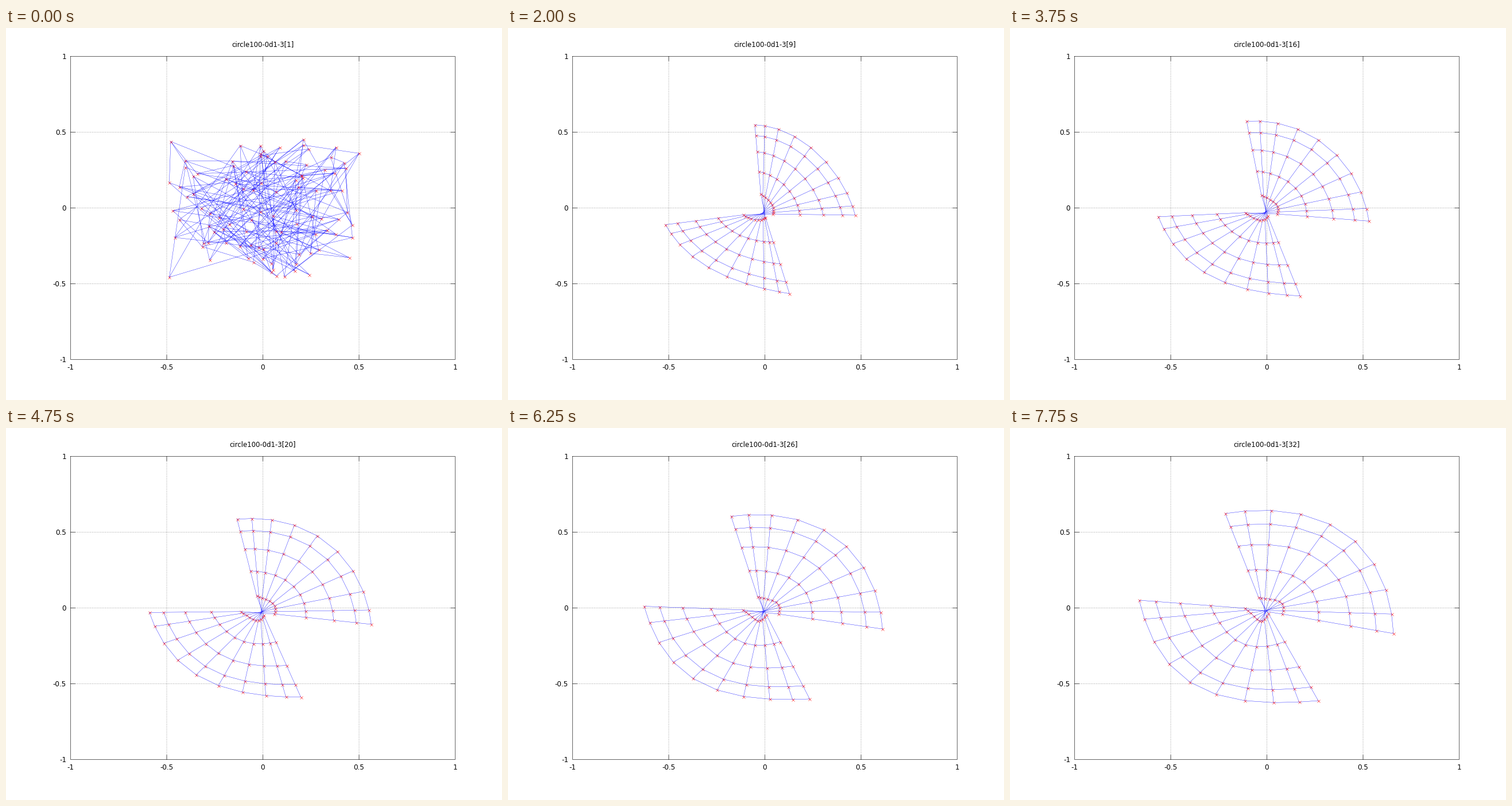
A matplotlib script that plays this animation: 864x648 px, repeating every 8 s.

```python
import numpy as np
import matplotlib.pyplot as plt
from matplotlib.animation import FuncAnimation
from matplotlib.collections import LineCollection

W, H = 864, 648
LEFT, RIGHT, TOP, BOTTOM = 112.5, 782.5, 49.5, 577.5
CENTER = np.array([446, 321])
STEPS, SIZE = 32, 10        # time steps, nodes along each side of the net
FIRST = 5                   # from here on the fan opens at a steady rate

# Spokes lie closer together at both ends of an arc
even = np.linspace(0, 1, SIZE)
spoke = (even + (1 - np.cos(np.pi * even)) / 2) / 2
knots = spoke[::3]

# How far each ring of one wing lies from the core to the rim
RINGS = np.array([1, 0.845, 0.612, 0.325, 0])


def arc(*points):
    """Cubic curve through four points, sampled at every spoke."""
    xy = np.array(points, float).T
    return np.stack([np.polyval(np.polyfit(knots, v, 3), spoke) for v in xy], 1)


def wing(rim, core):
    return core + (rim - core) * RINGS[:, None, None]


def fan(rim_a, core_a, core_b, rim_b):
    """Two wings joined at their cores: rings by spokes by xy."""
    lower = wing(arc(*rim_a), arc(*core_a))
    upper = wing(arc(*rim_b), arc(*core_b))
    return np.concatenate([lower, upper[::-1]])


narrow = fan([(285, 352), (331, 395), (416, 439), (480, 460)],
             [(410, 328), (423, 333), (441, 333), (448, 331)],
             [(458, 324), (459, 315), (453, 299), (442, 288)],
             [(591, 319), (562, 266), (497, 197), (442, 173)])
wide = fan([(225, 300), (277, 411), (409, 475), (537, 475)],
           [(409, 314), (425, 328), (439, 336), (450, 323)],
           [(474, 324), (474, 306), (452, 298), (433, 295)],
           [(668, 358), (634, 237), (506, 150), (375, 149)])


def net_at(n):
    if n == 1:
        rng = np.random.default_rng(3)
        return rng.uniform([284, 181], [615, 441], (SIZE, SIZE, 2))
    if n < FIRST:
        scale = 1 - 0.25 * ((FIRST - n) / 3) ** 2
        return CENTER + (narrow - CENTER) * scale
    t = (n - FIRST) / (STEPS - FIRST)
    return narrow + (wide - narrow) * t ** 0.9


plt.rcParams['font.family'] = 'DejaVu Sans'
fig = plt.figure(figsize=(W / 72, H / 72), dpi=72, facecolor='white')
ax = fig.add_axes([0, 0, 1, 1])
ax.set(xlim=(0, W), ylim=(H, 0))
ax.axis('off')


def line(xs, ys, **style):
    ax.plot(xs, ys, **{'color': 'black', 'lw': 0.6, 'snap': False, **style})


def draw_frame():
    dots = dict(color='0.45', lw=0.8, ls=(0, (1.2, 2.4)), dash_capstyle='butt')
    for i, label in enumerate(['-1', '-0.5', '0', '0.5', '1']):
        x = LEFT + (RIGHT - LEFT) * i / 4
        y = BOTTOM - (BOTTOM - TOP) * i / 4
        ax.text(x, 595, label, size=12, ha='center', va='baseline')
        ax.text(105, y + 4, label, size=12, ha='right', va='baseline')
        if 0 < i < 4:
            line([x, x], [TOP, BOTTOM], **dots)
            line([LEFT, RIGHT], [y, y], **dots)
            for a, b in ((TOP, TOP + 8), (BOTTOM - 8, BOTTOM)):
                line([x, x], [a, b])
            for a, b in ((LEFT, LEFT + 8), (RIGHT - 8, RIGHT)):
                line([a, b], [y, y])
    line([LEFT, RIGHT, RIGHT, LEFT, LEFT], [TOP, TOP, BOTTOM, BOTTOM, TOP])


draw_frame()
title = ax.text(447.5, 32, '', size=11.6, ha='center', va='baseline')
threads = LineCollection([], colors='blue', linewidths=0.4, zorder=2)
ax.add_collection(threads, autolim=False)
crosses, = ax.plot([], [], 'x', color='red', ms=5, mew=0.5, zorder=3)
crosses.set_snap(False)


def update(frame):
    n = frame + 1
    net = net_at(n)
    threads.set_segments([*net, *net.swapaxes(0, 1)])
    crosses.set_data(net[..., 0].ravel(), net[..., 1].ravel())
    title.set_text(f'circle100-0d1-3[{n}]')
    return threads, crosses, title


anim = FuncAnimation(fig, update, frames=STEPS, interval=250, repeat=True)
plt.show()
```
